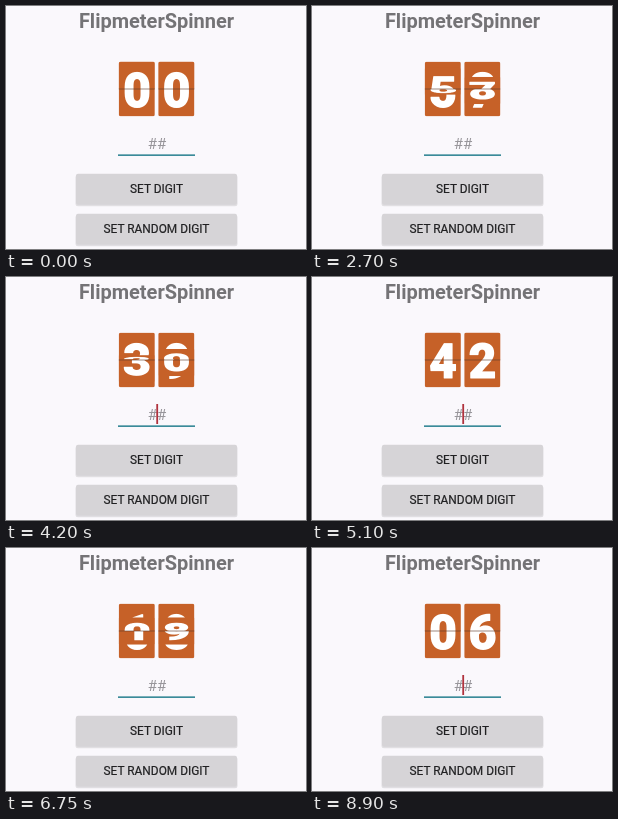
These frames come from a looping animation (300 by 243 pixels, 9.2 s). An HTML page with a canvas:

```html
<!DOCTYPE html>
<html lang="en">
<head>
<meta charset="utf-8">
<title>FlipmeterSpinner</title>
<style>
  html, body { margin: 0; width: 100%; height: 100%; overflow: hidden; background: #faf8fc; }
  .stage { position: relative; width: 300px; height: 243px; overflow: hidden; }
  canvas, svg { position: absolute; left: 0; top: 0; width: 300px; height: 243px; }
  text { font-family: Roboto, "Open Sans", sans-serif; text-anchor: middle; }
  .title { font-size: 20px; font-weight: 700; fill: #747376; }
  .hint { font-size: 15px; fill: #98969b; }
  .label { font-size: 11.9px; font-weight: 400; fill: #202022; stroke: #202022; stroke-width: .2px; }
  .face { fill: #d6d4d7; }
  .shadow { fill: #000; opacity: .1; }

  .caret { fill: #b0323e; opacity: 0; animation: blink 9.2s step-end infinite; }
  .ripple { fill: #000; opacity: 0; transform-origin: 148px 0; animation: ripple 9.2s linear infinite; }
  .touch { fill: #fff; opacity: 0; animation: touch 9.2s linear infinite; }
  .second .ripple, .second .touch { animation-delay: 3.6s; }

  @keyframes blink {
    0%, 9.23%, 26.08%, 36.95%, 47.82%, 58.69%, 69.56%, 80.43%, 91.3% { opacity: 0; }
    4.34%, 14.67%, 31.52%, 42.39%, 53.26%, 64.13%, 75%, 85.86%, 96.73%, 100% { opacity: 1; }
  }
  @keyframes ripple {
    0%, 18.4% { opacity: 0; transform: scale(.2); }
    18.5% { opacity: .03; transform: scale(.2); }
    20.65% { opacity: .07; transform: scale(1); }
    23.9% { opacity: .06; transform: scale(2.1); }
    27.2%, 100% { opacity: 0; transform: scale(2.1); }
  }
  @keyframes touch {
    0%, 18.4% { opacity: 0; }
    18.5%, 21% { opacity: .4; }
    22%, 100% { opacity: 0; }
  }
</style>
</head>
<body>
<div class="stage">
  <svg viewBox="0 0 300 243">
    <defs>
      <clipPath id="clip"><rect x="70" y="-15.5" width="161" height="31" rx="2"/></clipPath>
    </defs>
    <text class="title" x="150.5" y="22.4">FlipmeterSpinner</text>
    <text class="hint" x="151" y="143">##</text>
    <rect x="112" y="148.4" width="77" height="1.5" fill="#26808f"/>
    <rect class="caret" x="150.3" y="127" width="1.8" height="20"/>

    <g class="first" transform="translate(0 183.2)">
      <rect class="shadow" x="69.5" y="-14.5" width="162" height="31.5" rx="2.5"/>
      <rect class="face" x="70" y="-15.5" width="161" height="31" rx="2"/>
      <g clip-path="url(#clip)">
        <circle class="ripple" cx="148" r="42"/>
        <circle class="touch" cx="165" r="8.5"/>
      </g>
      <text class="label" x="150.5" y="3.9">SET DIGIT</text>
    </g>
    <g class="second" transform="translate(0 223.2)">
      <rect class="shadow" x="69.5" y="-14.5" width="162" height="31.5" rx="2.5"/>
      <rect class="face" x="70" y="-15.5" width="161" height="31" rx="2"/>
      <g clip-path="url(#clip)">
        <circle class="ripple" cx="148" r="42"/>
        <circle class="touch" cx="165" r="8.5"/>
      </g>
      <text class="label" x="150.5" y="3.9">SET RANDOM DIGIT</text>
    </g>
  </svg>
  <canvas></canvas>
</div>
<script>
const LOOP = 9200;
const MID = 83, HALF = 27.2, CARD = 36;
const RATIO = 2;

// Each wheel: [time in ms, total digits turned since zero]
const wheels = [
  { x: 112.8, turns: [[1950, 0], [3550, 11.12], [4650, 14], [5600, 14], [6750, 20.5], [7750, 28.1], [8450, 30]] },
  { x: 152.3, turns: [[1950, 0], [3550, 16.12], [4650, 22], [5600, 22], [6750, 28.5], [7750, 38.1], [8450, 46]] }
];

const canvas = document.querySelector('canvas');
canvas.width = 300 * RATIO;
canvas.height = 243 * RATIO;
const ctx = canvas.getContext('2d');

function turnAt(turns, t) {
  if (t <= turns[0][0]) return turns[0][1];
  for (let i = 1; i < turns.length; i++) {
    const [t0, a] = turns[i - 1], [t1, b] = turns[i];
    if (t < t1) return a + (b - a) * (t - t0) / (t1 - t0);
  }
  return turns[turns.length - 1][1];
}

// One half of a card, squashed towards the hinge
function drawHalf(x, digit, upper, scale) {
  if (scale <= 0) return;
  ctx.save();
  ctx.translate(x, MID);
  ctx.scale(1, scale);
  ctx.beginPath();
  ctx.rect(0, upper ? -HALF : 0, CARD, HALF);
  ctx.clip();
  ctx.fillStyle = '#c66128';
  ctx.beginPath();
  ctx.roundRect(0, -HALF, CARD, HALF * 2, 2);
  ctx.fill();
  ctx.font = '900 48px Roboto, "Open Sans", sans-serif';
  ctx.textAlign = 'center';
  ctx.fillStyle = ctx.strokeStyle = '#fff';
  ctx.lineWidth = 1;
  ctx.lineJoin = 'round';
  ctx.fillText(digit, CARD / 2 + .2, 18.1);
  ctx.strokeText(digit, CARD / 2 + .2, 18.1);
  ctx.restore();
}

function drawWheel({ x, turns }, t) {
  const turn = turnAt(turns, t);
  const p = turn % 1;
  const now = Math.floor(turn) % 10, next = (now + 1) % 10;
  drawHalf(x, next, true, 1);
  drawHalf(x, now, false, 1);
  drawHalf(x, now, true, 1 - p);
  drawHalf(x, next, false, p);
  ctx.fillStyle = 'rgba(92, 58, 40, .6)';
  ctx.fillRect(x, MID - .5, CARD, 1);
}

let start;
function frame(time) {
  start ??= time;
  const t = (time - start) % LOOP;
  ctx.setTransform(RATIO, 0, 0, RATIO, 0, 0);
  ctx.clearRect(0, 0, 300, 243);
  wheels.forEach(wheel => drawWheel(wheel, t));
  requestAnimationFrame(frame);
}
requestAnimationFrame(frame);
</script>
</body>
</html>
```
